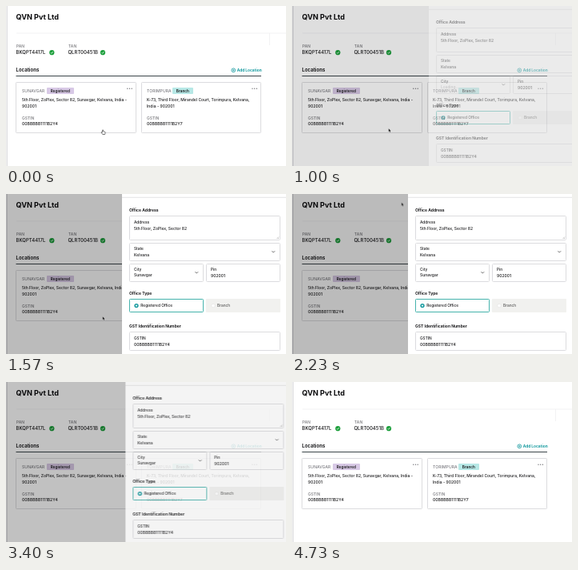
Write an HTML page that moves like this. It is 350 px wide and 200 px high and loops after 4760 ms.

```html
<!DOCTYPE html>
<html lang="en">
<head>
<meta charset="utf-8">
<title>Company locations</title>
<style>
  html, body { margin: 0; width: 100%; height: 100%; overflow: hidden; background: #fff; }
  svg { display: block; width: 100%; height: 100%; }
  text { font-family: Inter, "Open Sans", sans-serif; font-size: 5px; font-weight: 500; fill: #1c1c1e; white-space: pre; }
  .title { font-size: 9.1px; font-weight: 700; fill: #0c0c0e; }
  .code { font-size: 6px; }
  .head { font-size: 6px; font-weight: 700; }
  .sub { font-size: 5px; font-weight: 700; }
  .num { font-size: 5.1px; }
  .label { fill: #77777b; }
  .city { fill: #7b7b80; letter-spacing: .1px; }
  .small { font-size: 4.8px; }
  .muted { fill: #a5a5a9; }
  .teal { fill: #159a9f; font-weight: 700; font-size: 4.8px; }
  .tag { font-size: 4.7px; font-weight: 600; }
  .line { fill: none; stroke: #dcdcdf; stroke-width: .8; }
  .card { fill: #fff; stroke: #dcdcdf; stroke-width: 1; }
  .field { fill: #fff; stroke: #dcdcdf; stroke-width: 1; }
  .pick { fill: #fff; stroke: #45b3ac; stroke-width: 1; }
  .chev { fill: none; stroke: #444; stroke-width: .8; }

  .shade, .cursor, .hand, .arrow, .wait, .ready { animation: 4760ms linear infinite; }
  .shade { animation-name: shade; }
  .panel { animation: slide 4760ms linear infinite, fade 4760ms linear infinite; }
  .cursor { animation-name: cursor; }
  .hand { animation-name: hide-hand; animation-timing-function: step-end; }
  .arrow { animation-name: show-arrow; animation-timing-function: step-end; }
  .wait { animation-name: hide-wait; animation-timing-function: step-end; }
  .ready { animation-name: show-ready; animation-timing-function: step-end; }

  @keyframes shade {
    0% { opacity: 0; }
    18.7% { opacity: 0; animation-timing-function: ease-out; }
    25.63% { opacity: .265; }
    70.2% { opacity: .265; animation-timing-function: ease-in; }
    75.4%, 100% { opacity: 0; }
  }
  @keyframes slide {
    0% { transform: translate(195px, 0); }
    18.7% { transform: translate(195px, 0); animation-timing-function: ease-out; }
    25.84% { transform: translate(145px, 0); }
    70.2% { transform: translate(145px, 0); animation-timing-function: ease-in; }
    75.4%, 100% { transform: translate(195px, 0); }
  }
  @keyframes fade {
    0%, 18.7% { opacity: 0; }
    24.4%, 70.6% { opacity: 1; }
    75.4%, 100% { opacity: 0; }
  }
  @keyframes cursor {
    0% { transform: translate(121px, 153px); }
    35.7% { transform: translate(121px, 153px); animation-timing-function: ease-in-out; }
    46.8% { transform: translate(137px, 11px); }
    50%, 100% { transform: translate(140px, -12px); }
  }
  @keyframes hide-hand { 0% { opacity: 1; } 19.5%, 100% { opacity: 0; } }
  @keyframes show-arrow { 0% { opacity: 0; } 19.5%, 100% { opacity: 1; } }
  @keyframes hide-wait { 0% { opacity: 1; } 29.4%, 100% { opacity: 0; } }
  @keyframes show-ready { 0% { opacity: 0; } 29.4%, 100% { opacity: 1; } }
</style>
</head>
<body>
<svg viewBox="0 0 350 200" preserveAspectRatio="none">
  <defs>
    <g id="tick">
      <circle r="3.1" fill="#1d9f3c"/>
      <path d="M-1.4 .1L-.4 1.1 1.5 -1" fill="none" stroke="#fff" stroke-width=".8"/>
    </g>
    <g id="dots" fill="#77777b">
      <circle r=".7"/><circle cx="2.7" r=".7"/><circle cx="5.4" r=".7"/>
    </g>
    <path id="chev" class="chev" d="M-1.8 -.9L0 .9 1.8 -.9"/>
  </defs>

  <rect width="350" height="200" fill="#fff"/>
  <path d="M1.2 0V200" stroke="#cfcfd2" stroke-width="1"/>
  <path d="M13 34H350M329.5 34V49" stroke="#ededef" stroke-width=".7" fill="none"/>

  <text class="title" x="12.5" y="17">QVN Pvt Ltd</text>
  <text class="label" x="13" y="52">PAN</text>
  <text class="code" x="12.5" y="60.3">BKQPT4417L</text>
  <use href="#tick" x="57.3" y="58.2"/>
  <text class="label" x="78" y="52">TAN</text>
  <text class="code" x="77.5" y="60.3">QLRT00451B</text>
  <use href="#tick" x="121" y="58.2"/>

  <text class="head" x="12.5" y="82.3">Locations</text>
  <circle cx="284.3" cy="80.3" r="2.4" fill="none" stroke="#159a9f" stroke-width=".8"/>
  <path d="M283 80.3h2.6M284.3 79v2.6" stroke="#159a9f" stroke-width=".7"/>
  <text class="teal" x="288.7" y="82.1">Add Location</text>
  <path d="M12.5 87.5H319" stroke="#3a4448" stroke-width="1"/>

  <g>
    <rect class="card" x="12.5" y="95.5" width="150" height="63" rx=".8"/>
    <text class="city" x="20" y="107.8">SUNAVGAR</text>
    <rect x="51" y="102" width="34" height="8" rx="1" fill="#d8c9e6"/>
    <text class="tag" x="55.7" y="107.7">Registered</text>
    <use href="#dots" x="151.8" y="103.2"/>
    <text x="20" y="119.3">5th Floor, ZoPlex, Sector 82, Sunavgar, Kelvana, India -</text>
    <text x="20" y="126.6">902001</text>
    <text class="label" x="20" y="141.8">GSTIN</text>
    <text class="num" x="20" y="149">00BBBBB1111B2Y4</text>
  </g>
  <g>
    <rect class="card" x="169.5" y="95.5" width="149" height="63" rx=".8"/>
    <text class="city" x="176" y="107.8">TORIMPURA</text>
    <rect x="208" y="102" width="26" height="8" rx="1" fill="#b7e8e6"/>
    <text class="tag" x="212.8" y="107.7">Branch</text>
    <use href="#dots" x="308" y="103.2"/>
    <text x="176" y="119.3">K-73, Third Floor, Mirandel Court, Torimpura, Kelvana,</text>
    <text x="176" y="126.6">India - 902001</text>
    <text class="label" x="176" y="141.8">GSTIN</text>
    <text class="num" x="176" y="149">00BBBBB1111B2Y7</text>
  </g>

  <rect class="shade" width="350" height="200" fill="#000"/>

  <g class="panel">
    <rect width="260" height="200" fill="#fff"/>
    <path class="line" d="M0 4.3H260"/>
    <text class="sub" x="9" y="22">Office Address</text>

    <rect class="field" x="9.5" y="27.5" width="188" height="30" rx="1"/>
    <text class="small" x="15" y="36.8">Address</text>
    <text x="15" y="44.8">5th Floor, ZoPlex, Sector 82</text>
    <path d="M193.5 56l2.5-2.5M195 56l1-1" stroke="#888" stroke-width=".5"/>

    <rect class="field" x="9.5" y="61.5" width="188" height="22" rx="1"/>
    <text class="small" x="15" y="70">State</text>
    <text x="15" y="77.6">Kelvana</text>
    <use href="#chev" x="189.3" y="72.2"/>

    <rect class="field" x="9.5" y="87.5" width="92" height="22" rx="1"/>
    <text class="small" x="15" y="96">City</text>
    <text class="small muted wait" x="15" y="103.2">Loading...</text>
    <text class="ready" x="15" y="103.2">Sunavgar</text>
    <use href="#chev" x="93.3" y="98.2"/>

    <rect class="field" x="105.5" y="87.5" width="92" height="22" rx="1"/>
    <text class="small" x="111" y="96">Pin</text>
    <text x="111" y="103.8">902001</text>

    <text class="sub" x="9" y="125.8">Office Type</text>
    <rect class="pick" x="9.5" y="131.5" width="92" height="16" rx=".8"/>
    <circle cx="18" cy="139.6" r="1.9" fill="#fff" stroke="#159a9f" stroke-width="1.5"/>
    <text class="small" x="23.3" y="141.4">Registered Office</text>
    <rect x="105" y="131" width="93" height="17" rx=".8" fill="#f1f1ef"/>
    <circle cx="114" cy="139.6" r="2.2" fill="#fff" stroke="#e2e2e2" stroke-width=".6"/>
    <text class="small" x="119" y="141.4" fill-opacity=".7">Branch</text>

    <text class="sub" x="9" y="167.4">GST Identification Number</text>
    <rect class="field" x="9.5" y="172.5" width="188" height="23" rx="1"/>
    <text class="small" x="15" y="182">GSTIN</text>
    <text class="num" x="15" y="190">00BBBBB1111B2Y4</text>
  </g>

  <g class="cursor">
    <path class="hand" d="M-.6 2.2q.7-.7 1.3 0v1.6l2 .5q.6 .3 .4 1.2l-.5 2H-.2L-2 5q.3-.8 1.4 0z" fill="#fff" stroke="#222" stroke-width=".6"/>
    <path class="arrow" d="M-.3 0V4.4L.7 3.5 1.4 5 2.2 4.6 1.6 3.2H2.8z" fill="#111" stroke="#fff" stroke-width=".25"/>
  </g>
</svg>
</body>
</html>
```
